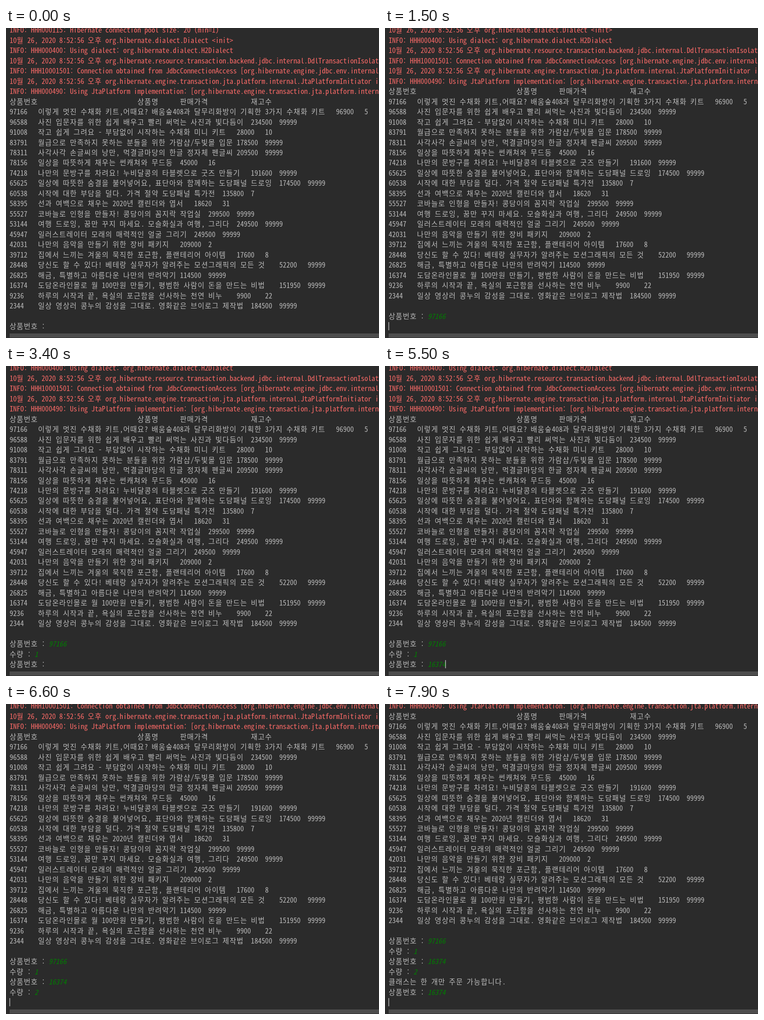
Write an HTML page that moves like this. It is 821 px wide and 682 px high and loops after 8000 ms.

```html
<!DOCTYPE html>
<html lang="ko">
<head>
<meta charset="utf-8">
<title>Console</title>
<style>
html, body { margin: 0; width: 100%; height: 100%; overflow: hidden; background: #2b2b2b; }
svg { display: block; width: 821px; height: 682px; overflow: hidden; }
text {
  font: 15.62px "Noto Sans Mono CJK KR", "Noto Sans CJK KR", "Noto Sans CJK", "Noto Sans Mono", monospace;
  fill: #bbb;
  white-space: pre;
}
.log { fill: #ff6b68; }
.input { fill: #007f00; font-style: italic; }
</style>
</head>
<body>
<svg viewBox="0 0 821 682">
  <g id="view">
    <rect id="selection" x="8" width="39" height="22.5" fill="#214283"/>
    <g id="lines"></g>
    <rect id="caret" width="1.5" height="18" fill="#bbb"/>
  </g>
  <rect x="8" y="672" width="813" height="9" fill="#4d4d4d"/>
</svg>
<script>
const LEFT = 8, CELL = 7.81, PITCH = 22.47, BASE = 662, TAB = 4, LOOP = 8000;
const SELECTED = 25;
const $ = id => document.getElementById(id);
const stamp = '10월 26, 2020 8:52:56 오후 org.hibernate.';

const logs = [
  'INFO: HHH000115: Hibernate connection pool size: 20 (min=1)',
  stamp + 'dialect.Dialect <init>',
  'INFO: HHH000400: Using dialect: org.hibernate.dialect.H2Dialect',
  stamp + 'resource.transaction.backend.jdbc.internal.DdlTransactionIsolatorNonJtaImpl',
  'INFO: HHH10001501: Connection obtained from JdbcConnectionAccess [org.hibernate.engine.jdbc.env.internal.JdbcEnvironmentInitiator]',
  stamp + 'engine.transaction.jta.platform.internal.JtaPlatformInitiator initiateService',
  'INFO: HHH000490: Using JtaPlatform implementation: [org.hibernate.engine.transaction.jta.platform.internal.NoJtaPlatform]'
];

const table = `상품번호|||||||상품명||판매가격|||재고수
97166|이렇게 멋진 수채화 키트,어때요? 배움숲408과 달무리화방이 기획한 3가지 수채화 키트|96900|5
96588|사진 입문자를 위한 쉽게 배우고 빨리 써먹는 사진과 빛다듬이|234500|99999
91008|작고 쉽게 그려요 - 부담없이 시작하는 수채화 미니 키트|28000|10
83791|월급으로 만족하지 못하는 분들을 위한 가람샵/두빛몰 입문|178500|99999
78311|사각사각 손글씨의 낭만, 먹결글마당의 한글 정자체 펜글씨|209500|99999
78156|일상을 따뜻하게 채우는 썬캐쳐와 무드등|45000|16
74218|나만의 문방구를 차려요! 누비달콩의 타블렛으로 굿즈 만들기|191600|99999
65625|일상에 따뜻한 숨결을 불어넣어요, 표단아와 함께하는 도담패널 드로잉|174500|99999
60538|시작에 대한 부담을 덜다. 가격 절약 도담패널 특가전|135800|7
58395|선과 여백으로 채우는 2020년 캘린더와 엽서|18620|31
55527|코바늘로 인형을 만들자! 콩담이의 꼼지락 작업실|299500|99999
53144|여행 드로잉, 꿈만 꾸지 마세요. 모슬화실과 여행, 그리다|249500|99999
45947|일러스트레이터 모래의 매력적인 얼굴 그리기|249500|99999
42031|나만의 음악을 만들기 위한 장비 패키지|209000|2
39712|집에서 느끼는 겨울의 묵직한 포근함, 플랜테리어 아이템|17600|8
28448|당신도 할 수 있다! 베테랑 실무자가 알려주는 모션그래픽의 모든 것|52200|99999
26825|해금, 특별하고 아름다운 나만의 반려악기|114500|99999
16374|도담온라인몰로 월 100만원 만들기, 평범한 사람이 돈을 만드는 비법|151950|99999
9236|하루의 시작과 끝, 욕실의 포근함을 선사하는 천연 비누|9900|22
2344|일상 영상러 콩누의 감성을 그대로. 영화같은 브이로그 제작법|184500|99999`
  .split('\n').map(row => row.replace(/\|/g, '\t'));

const ITEM = '상품번호 : ', COUNT = '수량 : ';
// [line, column, text, class]
const session = [
  [29, 0, ITEM], [29, 11, '97166', 'input'],
  [30, 0, COUNT], [30, 7, '1', 'input'],
  [31, 0, ITEM], [31, 11, '16374', 'input'],
  [32, 0, COUNT], [32, 7, '2', 'input'],
  [33, 0, '클래스는 한 개만 주문 가능합니다.'],
  [34, 0, ITEM], [34, 11, '16374', 'input']
];

// [time, bottom line, session parts shown, caret column (-1 = off), selected, caret line]
const states = [
  [0, 29, 1, -1], [700, 29, 1, 11], [1100, 29, 1, -1], [1300, 29, 2, 16],
  [1500, 30, 2, 0], [1700, 30, 3, 7], [2200, 30, 4, -1],
  [2400, 31, 4, 0], [2600, 31, 5, 11], [3400, 31, 5, -1],
  [3900, 31, 5, -1, true], [4000, 31, 5, 5, true, SELECTED],
  [4600, 31, 5, 11], [5300, 31, 5, -1], [5500, 31, 6, 16],
  [6000, 32, 6, 0], [6100, 32, 7, 7], [6500, 32, 8, 8],
  [6600, 33, 8, 0], [6800, 34, 10, 11], [7500, 34, 11, 16], [7900, 35, 11, 0]
];

const cellX = col => LEFT + col * CELL;
const baseY = line => BASE + (line - 29) * PITCH;

// Lays text on the terminal grid: Hangul takes two cells, tabs stop every four.
function addText(line, col, str, cls = '') {
  const el = document.createElementNS('http://www.w3.org/2000/svg', 'text');
  const xs = [];
  let out = '';
  for (const ch of str) {
    if (ch === '\t') {
      do { out += ' '; xs.push(cellX(col++)); } while (col % TAB);
    } else {
      out += ch;
      xs.push(cellX(col).toFixed(2));
      col += ch >= '\u1100' ? 2 : 1;
    }
  }
  el.setAttribute('xml:space', 'preserve');
  el.setAttribute('class', cls);
  el.setAttribute('x', xs.join(' '));
  el.setAttribute('y', baseY(line));
  el.textContent = out;
  $('lines').append(el);
  return el;
}

logs.forEach((s, i) => addText(i, 0, s, 'log'));
table.forEach((s, i) => addText(logs.length + i, 0, s));
const parts = session.map(p => addText(...p));
$('selection').setAttribute('y', baseY(SELECTED) - 17);

const show = (el, on) => el.setAttribute('visibility', on ? 'visible' : 'hidden');
let current;

function render() {
  const t = performance.now() % LOOP;
  const state = states.findLast(s => s[0] <= t);
  if (state !== current) {
    current = state;
    const [, bottom, count, col, selected = false, line = bottom] = state;
    $('view').setAttribute('transform', `translate(0 ${(29 - bottom) * PITCH})`);
    parts.forEach((el, i) => show(el, i < count));
    show($('selection'), selected);
    show($('caret'), col >= 0);
    $('caret').setAttribute('x', cellX(col) - 0.4);
    $('caret').setAttribute('y', baseY(line) - 15);
  }
  requestAnimationFrame(render);
}
render();
</script>
</body>
</html>
```
